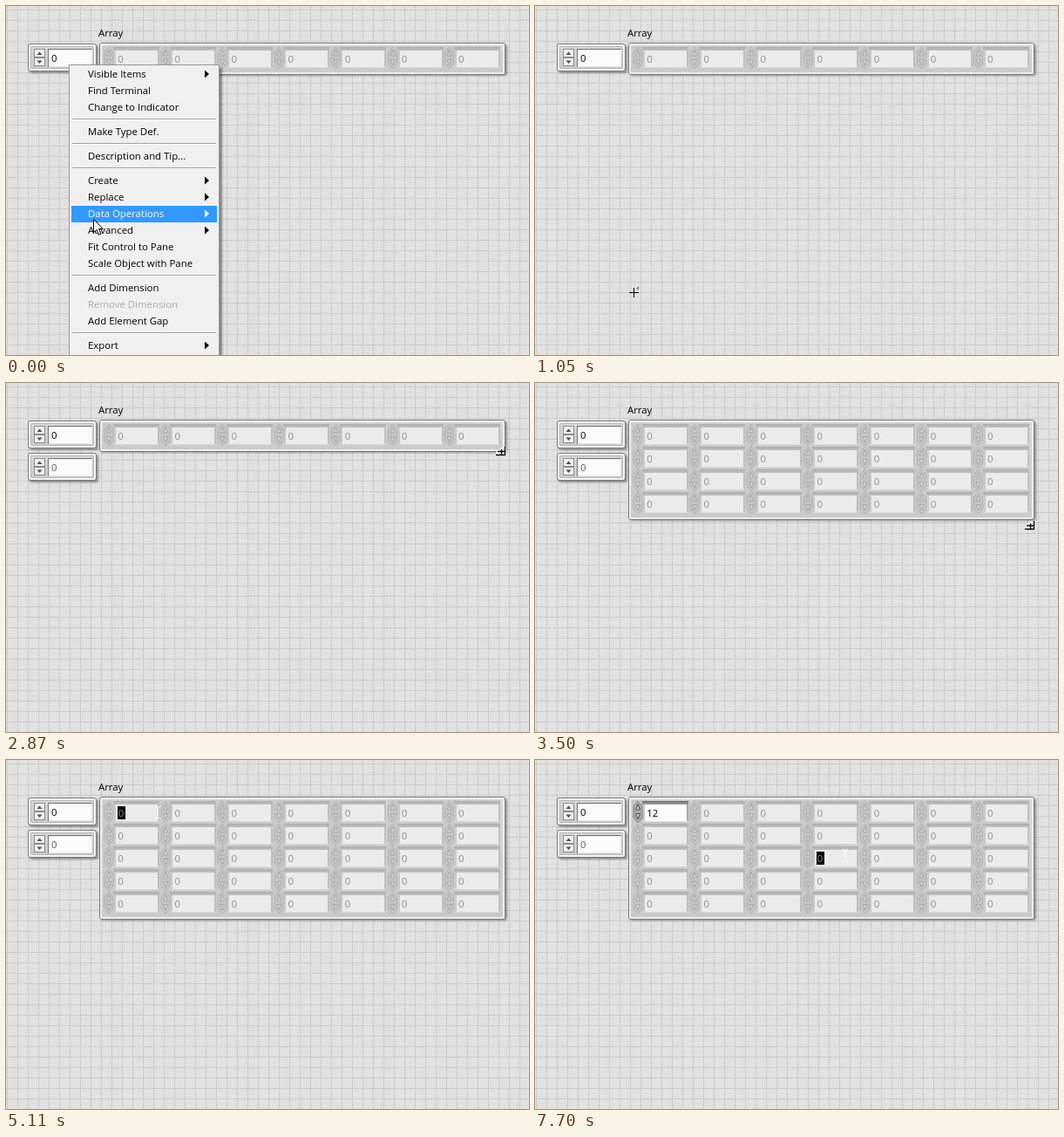
Recreate the animation shown at these times as an HTML page. Size 600 px wide and 400 px high, loop 8000 ms.

```html
<!DOCTYPE html>
<html lang="en">
<head>
<meta charset="utf-8">
<title>Array control</title>
<style>
html, body { margin: 0; width: 100%; height: 100%; overflow: hidden; background: #e1e1e1; }
svg { display: block; }
text { font: 11.4px "Open Sans", "Noto Sans", sans-serif; white-space: pre; }
rect { shape-rendering: crispEdges; }
.frame rect { shape-rendering: auto; }
.dim { fill: #8f8f8f; }
</style>
</head>
<body>
<svg id="stage" width="600" height="400" viewBox="0 0 600 400">
  <defs>
    <pattern id="grid" width="12" height="12" x="1" y="4" patternUnits="userSpaceOnUse">
      <rect width="12" height="12" fill="#e1e1e1"/>
      <path d="M.5 0V12M0 .5H12" stroke="#cbcbcb"/>
    </pattern>
    <linearGradient id="metal" x2="0" y2="1">
      <stop stop-color="#d9d9d9"/><stop offset="1" stop-color="#c9c9c9"/>
    </linearGradient>
    <linearGradient id="bar" x2="0" y2="1">
      <stop stop-color="#aeaeae"/><stop offset="1" stop-color="#c0c0c0"/>
    </linearGradient>
    <linearGradient id="barOn" x2="0" y2="1">
      <stop stop-color="#6c6c6c"/><stop offset="1" stop-color="#a4a4a4"/>
    </linearGradient>
    <filter id="soft" x="-10%" y="-20%" width="120%" height="140%"><feGaussianBlur stdDeviation="1.3"/></filter>
    <g id="cell">
      <rect width="65" height="26" fill="#cacaca"/>
      <rect x="12" y="1" width="53" height="4" fill="url(#bar)"/>
      <rect x="63" y="5" width="2" height="18" fill="#bfbfbf"/>
      <path d="M7 1L12 7V20L7 26L2 20V7Z" fill="#c5c5c5" stroke="#b2b2b2"/>
      <path d="M4.500 11L7 4.500L9.500 11ZM4.500 15.500H9.500L7 22Z" fill="#d3d3d3" stroke="#a6a6a6"/>
      <rect x="15" y="5" width="48" height="19" fill="#ebebeb"/>
      <rect x="13" y="24" width="51" height="1" fill="#dadada"/>
    </g>
    <g id="cellOn">
      <rect width="65" height="26" fill="#c6c6c6"/>
      <rect x="12" y="1" width="53" height="4" fill="url(#barOn)"/>
      <rect x="63" y="5" width="2" height="18" fill="#a6a6a6"/>
      <path d="M7 1L12 7V20L7 26L2 20V7Z" fill="#a9a9a9" stroke="#868686"/>
      <path d="M4.500 11L7 4.500L9.500 11ZM4.500 15.500H9.500L7 22Z" fill="#ccc" stroke="#4c4c4c"/>
      <rect x="15" y="5" width="48" height="19" fill="#fbfbfb"/>
      <rect x="13" y="24" width="51" height="1" fill="#e6e6e6"/>
    </g>
    <g id="index">
      <g class="frame">
        <rect x="2" y="2" width="79" height="32" rx="3" opacity=".35" filter="url(#soft)"/>
        <rect x=".5" y=".5" width="78" height="31" rx="2.500" fill="url(#metal)" stroke="#7b7b7b"/>
        <rect x="2" y="2" width="75" height="28" rx="2" fill="none" stroke="#f4f4f4" stroke-width="2"/>
        <rect x="3.500" y="3.500" width="72" height="25" rx="1" fill="none" stroke="#b9b9b9"/>
      </g>
      <rect x="7.500" y="6.500" width="12" height="9" fill="#f1f1f1" stroke="#8b8b8b"/>
      <rect x="7.500" y="16.500" width="12" height="9" fill="#f1f1f1" stroke="#8b8b8b"/>
      <path d="M10.500 13L13.500 9.500L16.500 13ZM10.500 19.500H16.500L13.500 23Z" fill="#4e4e4e"/>
      <rect x="23" y="6" width="51" height="21" fill="#777"/>
      <rect x="24" y="7" width="50" height="20" fill="#e6e6e6"/>
      <rect x="24" y="8" width="49" height="18" fill="#fbfbfb"/>
    </g>
  </defs>

  <rect width="600" height="400" fill="url(#grid)"/>
  <text x="106" y="35">Array</text>
  <use href="#index" x="25" y="43"/><text x="52" y="64">0</text>
  <g id="index2"><use href="#index" x="25" y="80"/><text x="52" y="101" fill="#5c5c5c">0</text></g>

  <g class="frame">
    <rect class="grow" data-h="36" x="109" y="44" width="466" height="36" rx="3" opacity=".35" filter="url(#soft)"/>
    <rect class="grow" data-h="36" x="107.500" y="42.500" width="465" height="36" rx="2.500" fill="url(#metal)" stroke="#7b7b7b"/>
    <rect class="grow" data-h="33" x="109" y="44" width="462" height="33" rx="1" fill="none" stroke="#ededed" stroke-width="2"/>
  </g>
  <g id="rows"></g>

  <g id="active">
    <use id="lit" href="#cellOn" x="111" y="46"/>
    <rect id="paper" x="126" y="51" width="48" height="19" fill="#f5f5f5"/>
    <text id="typed" x="128.300" y="65"></text>
    <rect id="caret" y="53" width="2" height="15"/>
    <rect id="focus" x="111.500" y="46.500" width="66" height="27" fill="none" stroke="#000"/>
  </g>
  <g id="pick"><rect width="9" height="15"/><text class="dim" x=".8" y="12">0</text></g>

  <g id="handles" fill="#4c94dc"></g>
  <g id="cellHandles" fill="#5a9be0">
    <rect x="512" y="161" width="7" height="7"/><rect x="561" y="161" width="7" height="7"/>
  </g>
  <g id="menu"></g>

  <path id="arrow" d="M.5 .5V15.500L4 12.300L6.500 18.300L9 17.200L6.600 11.500H11.300Z" fill="#fff" stroke="#000"/>
  <path id="pointer" d="M.5 .5V11.500L3 9.300L5 14.300L7 13.300L5 8.500H8Z" fill="#fff" stroke="#000" stroke-width="1.500"/>
  <g id="cross">
    <path d="M-5 .5H6M.5 -5V6" stroke="#000"/>
    <path d="M4 -4.500H5M5 -3.500H6M5 -5.500H6" stroke="#222"/>
  </g>
  <g id="resize">
    <path d="M-5 6V1L2 -5H7V6Z" fill="#eee"/>
    <path d="M-5 4.500H6M-3 .5H6M1.500 -2V5M5.500 -5V5" stroke="#000" stroke-width="1.300"/>
  </g>
  <path id="beam" d="M-3 -6.500H-1L.5 -5.500L2 -6.500H4M.5 -5.500V6M-3 7H-1L.5 6L2 7H4" fill="none" stroke="#fff" opacity=".75"/>
</svg>
<script>
const $ = id => document.getElementById(id);
const LOOP = 8000, STEP = 70, PITCH = 26;

// label, row centre, has submenu
const items = [
  ['Visible Items', 78, 1], ['Find Terminal', 97], ['Change to Indicator', 116],
  ['Make Type Def.', 144], ['Description and Tip...', 172],
  ['Create', 200, 1], ['Replace', 219, 1], ['Data Operations', 238, 1], ['Advanced', 257, 1],
  ['Fit Control to Pane', 276], ['Scale Object with Pane', 295],
  ['Add Dimension', 323], ['Remove Dimension', 342], ['Add Element Gap', 361], ['Export', 389, 1]
];
const box = (x, y, w, h, fill) => `<rect x="${x}" y="${y}" width="${w}" height="${h}" fill="${fill}"/>`;

$('menu').innerHTML =
  '<rect x="76" y="71" width="172" height="340" opacity=".4" filter="url(#soft)"/>' +
  box(72, 67, 173, 340, '#979797') + box(73, 68, 171, 340, '#f0f0f0') +
  [130, 158, 186, 309, 375].map(y => box(76, y - 1, 165, 1, '#a0a0a0') + box(76, y, 165, 1, '#fff')).join('') +
  items.map(([label, y, sub]) => `<g class="item">${box(75, y - 9, 167, 19, '#39f')}` +
    `<text x="94" y="${y + 4}">${label}</text>` +
    (sub ? `<path d="M228 ${y - 4.5}V${y + 4.5}L233 ${y}Z"/>` : '') + '</g>').join('');
const itemNodes = [...document.querySelectorAll('.item')];

$('rows').innerHTML = [0, 1, 2, 3, 4].map(r => '<g>' + [0, 1, 2, 3, 4, 5, 6].map(c =>
  `<g transform="translate(${111 + 65.1 * c} ${46 + PITCH * r})"><use href="#cell"/>` +
  '<text class="dim" x="17.3" y="19">0</text></g>').join('') + '</g>').join('');
const firstZero = $('rows').querySelector('text');

// cursor tracks: time, x, y
const tracks = {
  arrow: { from: 0, to: 1050, path: [[0, 100, 244], [490, 111, 327]] },
  cross: { from: 1050, to: 2520, path: [[1050, 113, 328], [1539, 113, 328], [1540, 86, 127], [1610, 86, 127],
    [1680, 118, 130], [1750, 205, 128], [1820, 335, 114], [1890, 454, 97], [2030, 530, 85], [2450, 567, 78]] },
  resize: { from: 2520, to: 4340, path: [[2870, 567, 78], [3640, 567, 182]] },
  pointer: { from: 4340, to: 4620, path: [[4340, 563, 174], [4480, 567, 181]] },
  beam: { from: 4620, to: LOOP, path: [[4620, 125, 60], [4899, 125, 60], [4900, 174, 60], [6440, 174, 60],
    [6510, 168, 85], [6790, 230, 120], [7070, 320, 146], [7280, 371, 132], [7490, 355, 109]] }
};

function along(path, t) {
  const i = path.findIndex(p => p[0] > t);
  if (i === 0) return path[0].slice(1);
  if (i < 0) return path[path.length - 1].slice(1);
  const [a, b] = [path[i - 1], path[i]], k = (t - a[0]) / (b[0] - a[0]);
  return [1, 2].map(n => Math.round(a[n] + (b[n] - a[n]) * k));
}
const show = (el, on) => { el.style.display = on ? '' : 'none'; };
const move = (el, x, y) => el.setAttribute('transform', `translate(${x} ${y})`);

function drawMenu(t) {
  show($('menu'), t < 1050);
  const tip = along(tracks.arrow.path, t)[1];
  itemNodes.forEach((node, i) => {
    const y = items[i][1], hot = tip >= y - 9 && tip < y + 10;
    show(node.firstChild, hot);
    node.setAttribute('fill', hot ? '#fff' : i === 12 ? '#a2b0a2' : '#000');
  });
}

function drawArray(t) {
  const rows = 1 + Math.round((along(tracks.resize.path, t)[1] - 78) / PITCH);
  const extra = (rows - 1) * PITCH;
  [...$('rows').children].forEach((row, i) => show(row, i < rows));
  document.querySelectorAll('.grow').forEach(el => el.setAttribute('height', +el.dataset.h + extra));

  const on = (t >= 2310 && t < 2870) || (t >= 3780 && t < 4340) || (t >= 4410 && t < 4620);
  show($('handles'), on);
  if (on) {
    const h = 38 + extra;
    $('handles').innerHTML = [0, .5, 1].flatMap(u => [0, .5, 1].filter(v => u !== .5 || v !== .5)
      .map(v => box(104 + Math.round(467 * u), 39 + Math.round(h * v), 7, 7, '#4c94dc'))).join('');
  }
  show($('cellHandles'), t >= 4340 && t < 4410);
}

function drawEdit(t) {
  const text = t < 6020 ? '' : t < 6300 ? '1' : '12', done = t >= 7350;
  show($('active'), text);
  show(firstZero, !text);
  $('typed').textContent = text;
  show($('lit'), done);
  show($('paper'), !done);
  show($('focus'), t >= 6510 && !done);
  show($('caret'), !done);
  $('caret').setAttribute('x', text.length > 1 ? 140 : 134);
  const second = t >= 7700;
  show($('pick'), (t >= 5110 && t < 6020) || second);
  move($('pick'), second ? 323 : 128, second ? 105 : 53);
}

function draw(t) {
  drawMenu(t);
  drawArray(t);
  drawEdit(t);
  show($('index2'), t >= 1120);
  for (const [id, { from, to, path }] of Object.entries(tracks)) {
    show($(id), t >= from && t < to);
    move($(id), ...along(path, t));
  }
}

const start = performance.now();
function tick() {
  const t = (performance.now() - start) % LOOP;
  draw(Math.floor(t / STEP) * STEP);
  requestAnimationFrame(tick);
}
tick();
</script>
</body>
</html>
```
